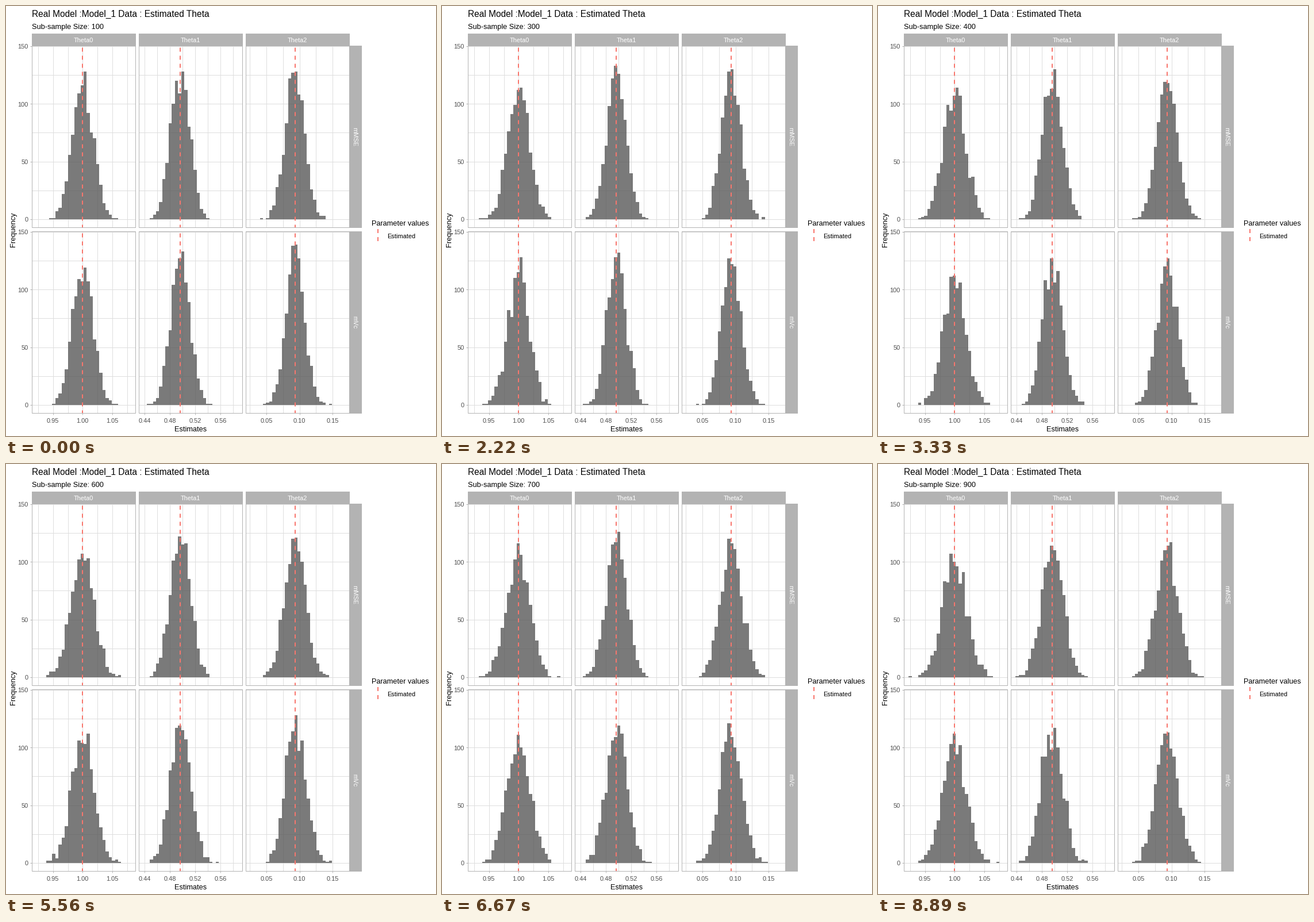
A matplotlib script that plays this animation: 748x748 px, repeating every 10000 ms.

```python
import matplotlib.pyplot as plt
import numpy as np
from matplotlib.animation import FuncAnimation
from matplotlib.patches import Rectangle

SIDE, DPI = 748, 64
PT = 72 / DPI                      # points per pixel
STRIP, GRID, RED = "#B3B3B3", "#DEDEDE", "#F8766D"
BINS = 30
PANEL_W, PANEL_H = 180, 316
PAD = PANEL_W / 22                 # 5 % of the data range on both sides
BIN_W = (PANEL_W - 2 * PAD) / BINS
UNIT = 2.009                       # pixels per count
SAMPLES = 1000
SIZES = range(100, 1000, 100)
FRAMES, LOOP_MS = 200, 10000

ROWS = (("mMSE", 69), ("mVc", 392))

# name, left edge, estimate, first tick, tick step, tick labels, mean bin, spread
COLS = (
    ("Theta0", 45, 133, 81.7, 51.6, ("0.95", "1.00", "1.05"), 14.2, 3.4),
    ("Theta1", 231, 303, 241.4, 43.9, ("0.44", "0.48", "0.52", "0.56"), 11.3, 3.0),
    ("Theta2", 417, 503, 453.2, 57.4, ("0.05", "0.10", "0.15"), 13.8, 3.05),
)

fig = plt.figure(figsize=(SIDE / DPI, SIDE / DPI), dpi=DPI, facecolor="white")
ax = fig.add_axes((0, 0, 1, 1))
ax.axis("off")


def text(x, y, s, size=11, color="black", **kw):
    return ax.text(x, y, s, fontsize=size * PT, color=color,
                   family="Liberation Sans", **kw)


def hairline(x, y, color=GRID, zorder=1):
    """One-pixel line centred on whole pixels."""
    ax.plot(np.round(x) + 0.5, np.round(y) + 0.5, color=color, lw=PT,
            snap=False, solid_capstyle="butt", zorder=zorder)


def dashed(x, bottom, top, offset=0):
    ax.plot((x, x), (bottom, top), color=RED, lw=2 * PT, snap=False,
            ls=(offset, (3.5, 3.5)), dash_capstyle="butt", zorder=4)


def strip(x, y, w, h):
    ax.add_patch(Rectangle((x, y), w, h, fc=STRIP, lw=0))


def zero_of(top):
    return top + 302.1


def histogram(size, panel):
    """Bin counts of simulated estimates; the spread grows with the size."""
    mean, spread = COLS[panel % 3][-2:]
    sd = spread + 0.5 * (size - 100) / 800
    rng = np.random.default_rng(size + panel)
    draws = rng.normal(mean + 0.5, sd, 2 * SAMPLES)
    counts, _ = np.histogram(draws, BINS, (0, BINS))
    return counts // 2


def draw_panel(top, left, estimate, tick, step, labels):
    right, bottom, zero = left + PANEL_W, top + PANEL_H, zero_of(top)
    for value in range(0, 151, 25):
        y = zero - value * UNIT
        hairline((left, right), (y, y))
    for k in range(-1, 2 * len(labels)):
        x = tick + k * step / 2
        if left < x < right:
            hairline((x, x), (top, bottom))
    edges = left + PAD + BIN_W * np.arange(BINS + 1)
    bars = ax.stairs(np.full(BINS, zero), edges, baseline=zero, fill=True,
                     color="#595959", alpha=0.8, lw=0, antialiased=False, zorder=3)
    dashed(estimate, bottom, top, offset=1.25)
    ax.add_patch(Rectangle((left + 0.5, top + 0.5), PANEL_W, PANEL_H, fill=False,
                           ec=STRIP, lw=PT, snap=False, zorder=5))
    return bars


panels = [(zero_of(top), draw_panel(top, *col[1:6])) for _, top in ROWS for col in COLS]
ax.set(xlim=(0, SIDE), ylim=(SIDE, 0))

for name, left, _, tick, step, labels, *_ in COLS:
    strip(left, 48, PANEL_W + 1, 21)
    text(left + 90, 62.5, name, color="white", ha="center")
    for k, label in enumerate(labels):
        x = tick + k * step
        hairline((x, x), (708, 711), STRIP)
        text(x, 725, label, color="#4D4D4D", ha="center")

for name, top in ROWS:
    strip(597, top, 22, PANEL_H + 1)
    text(606, top + 158, name, color="white", rotation=270, ha="center", va="center")
    for value in range(0, 151, 50):
        y = zero_of(top) - value * UNIT
        hairline((42, 45), (y, y), STRIP)
        text(39, y + 4.3, str(value), color="#4D4D4D", ha="right")

text(45, 19, "Real Model :Model_1 Data : Estimated Theta", 15.5)
subtitle = text(45, 39.5, "", 12.75)
text(321, 740, "Estimates", 12.75, ha="center")
text(13.5, 389, "Frequency", 12.75, rotation=90, ha="center", va="center")
text(636, 382, "Parameter values", 12.75)
text(663, 404, "Estimated")
dashed(647, 409, 387)


def update(i):
    # the short frames let each size appear on time, on a 50 ms grid
    size = SIZES[(i * len(SIZES) + len(SIZES) - 1) // FRAMES]
    subtitle.set_text(f"Sub-sample Size: {size}")
    for k, (zero, bars) in enumerate(panels):
        bars.set_data(zero - UNIT * histogram(size, k))
    return [subtitle, *(bars for _, bars in panels)]


anim = FuncAnimation(fig, update, frames=FRAMES, interval=LOOP_MS / FRAMES,
                     repeat=True, repeat_delay=0)
plt.show()
```
